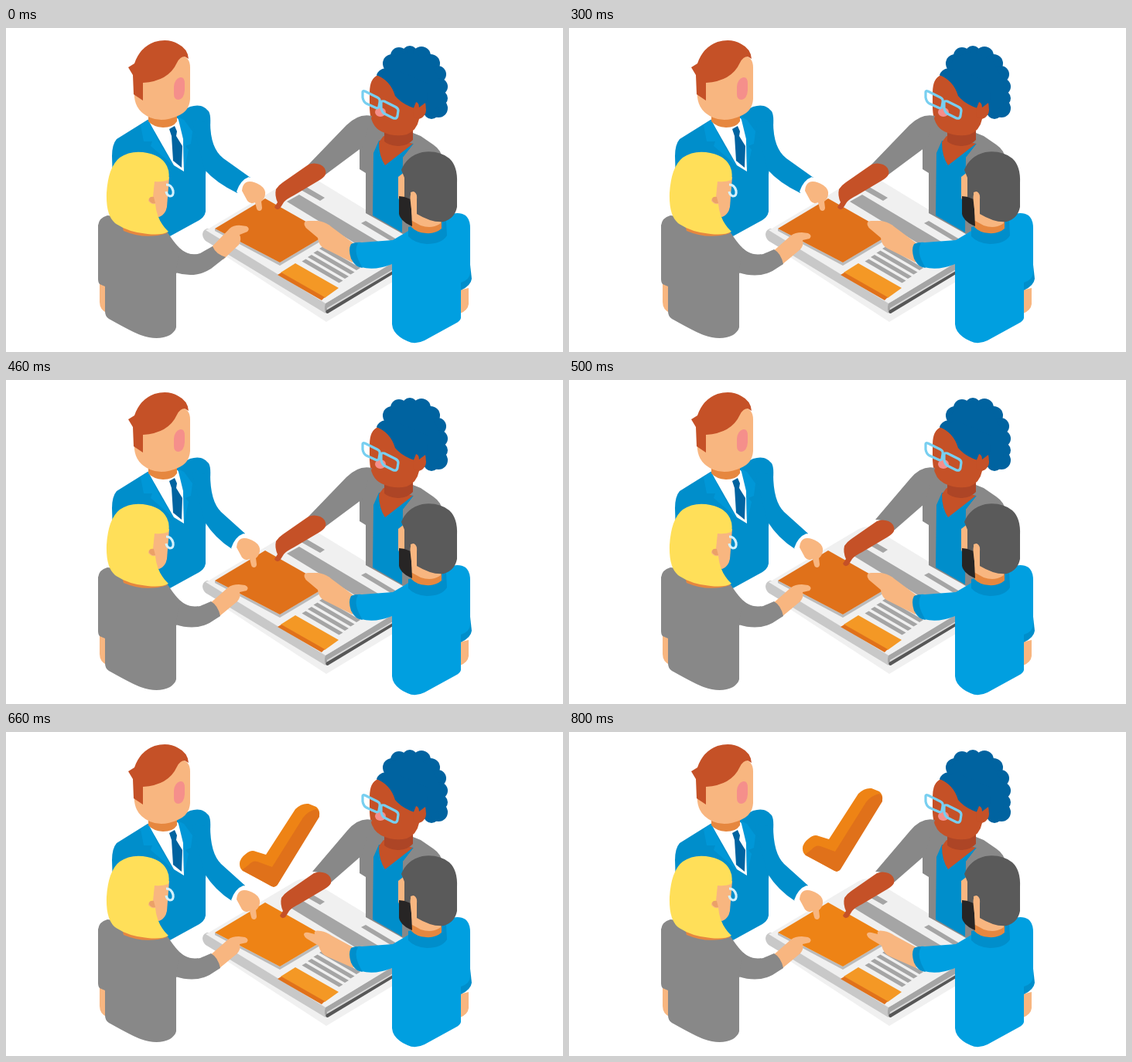
An HTML page for the animation above (0.9 s loop, 720 by 420 pixels).

```html
<!DOCTYPE html>
<html lang="en">
<head>
<meta charset="utf-8">
<title>Team agreement</title>
<style>
  html, body { margin: 0; width: 100%; height: 100%; overflow: hidden; background: #fff; }
  svg { display: block; width: 100vw; height: 100vh; }
  .navy { fill: #0063a0; }
  .blue { fill: #008ecb; }
  .lapel { fill: #0097d7; }
  .sky { fill: #009fe0; }
  .grey { fill: #888; }
  .bar { fill: #a5a5a5; }
  .paper { fill: #f0f0f0; }
  .skin { fill: #f8b680; }
  .neck { fill: #e6873f; }
  .brown { fill: #c55127; }
  .pink { fill: #f58f8b; }
  .light { fill: #ee8315; }
  .dark { fill: #e0711a; }
  .white { fill: #fff; }
  .specs { fill: none; stroke: #78cff0; stroke-width: 3.2; stroke-linejoin: round; }
  .specs.pale { stroke: #d4f1fc; }
</style>
</head>
<body>
<svg viewBox="0 0 720 420">
  <g id="newspaper">
    <path class="paper" d="M272 288L414 381L500 329V300Z"/>
    <path fill="#c8c8c8" d="M260 260C253 262 252 270 258 276L413 370L418 352L280 262Z"/>
    <path class="bar" d="M413 357L500 304V319L415 370Q410 366 413 357Z"/>
    <path fill="#d8d8d8" d="M415 363L500 313V315L415 366Z"/>
    <path fill="#575757" d="M414 366L500 315V319L416 370Q412 370 414 366Z"/>
    <path class="paper" d="M258 262Q263 260 267 257L375 193Q386 187 397 194L515 266L500 304L413 357Z"/>
    <path class="bar" d="M376 207L383 203L412 220L406 224Z"/>
    <path class="bar" d="M363 225L379 216L483 278L466 288Z"/>
    <path class="bar" d="M459 253L465 250L505 274L499 277Z"/>
    <g id="lines"></g>
    <path fill="#bbb" d="M270 260L354 304L416 267V271L354 308L270 263Z"/>
    <path id="sheet" d="M270 260L335 221L416 267L354 304Z"/>
    <path fill="#f49825" d="M374 305L430 337L412 350L355 317Z"/>
    <path class="dark" d="M356 317L412 349L408 353L351 320Z"/>
  </g>

  <g id="mark">
    <path class="light" d="M302 151Q302 144 310 138Q317 132 323 135L336 139L374 80Q382 72 391 73L401 77Q406 81 405 88L350 179L346 181L306 160Q302 157 302 151Z"/>
    <path class="dark" d="M305 159L314 152Q319 146 325 148L344 155L384 91Q391 82 401 80Q406 82 405 90L351 178Q348 182 343 180Z"/>
  </g>

  <g id="suited-man">
    <path class="blue" d="M137 166Q137 151 143 144L183 119L222 110L238 102Q254 97 262 108Q265 113 264 126L262 155L258 190V238Q257 245 250 249L210 271L138 200Z"/>
    <path id="sleeve" class="blue"/>
    <g id="suited-hand">
      <path class="white" d="M298 212Q303 197 314 193L320 198L306 217Q301 217 298 212Z"/>
      <path class="skin" d="M305 211Q306 199 315 199Q321 199 329 204Q336 209 335 216Q334 222 330 225L331 233C331 238 325 238 324 234L322 226Q316 229 312 224Z"/>
    </g>
    <path class="white" d="M184 120L222 117L229 128L230 186L217 178Z"/>
    <path class="lapel" d="M184 119L174 126L178 147L189 147L187 153L216 178L197 147ZM222 115L230 119L241 134L239 150L232 153L236 158L230 185L229 144Z"/>
    <path class="navy" d="M211 131L218 127L221 134L220 140L228 153L227 181L216 172L214 140Z"/>
    <path class="neck" d="M184 108H221V121Q216 129 203 129Q190 128 184 121Z"/>
    <path class="skin" d="M165 58L226 35Q238 38 238 51V92Q237 108 222 114Q202 123 186 116Q168 108 166 90Z"/>
    <path class="brown" d="M158 51L166 46Q173 25 192 18Q210 13 223 21Q235 27 236 40L231 37Q225 37 221 45Q210 69 177 71V94L165 86L164 61Z"/>
    <path class="pink" d="M217 76Q218 66 225 64Q231 63 231 72V81Q230 92 223 93Q217 93 217 86Z"/>
  </g>

  <g id="curly-woman">
    <path class="grey" d="M457 123Q462 112 475 115L486 120L536 140L552 151Q564 159 564 171L540 262L513 267L465 240V188L457 183Z"/>
    <path class="blue" d="M482 146L475 162L474 243L512 265L513 168L527 150Z"/>
    <path class="brown" d="M482 148L488 140L526 150L490 178Q482 166 482 148Z"/>
    <path class="grey" d="M527 150L513 168V266L520 262L560 165L536 144Z"/>
    <path fill="#ad4526" d="M489 132L526 128V145Q519 153 506 153Q494 152 489 147Z"/>
    <g id="curls" class="navy"></g>
    <path class="navy" d="M479 61Q481 54 490 52L498 38L522 30L548 42L562 70L561 100L548 112L524 110Z"/>
    <path class="brown" d="M470 84Q470 65 481 61Q491 62 496 67Q502 91 527 99L543 103Q544 115 534 118Q531 133 518 138Q501 142 485 134Q471 127 470 104Z"/>
    <path class="navy" d="M479 61L500 52L546 72L543 105L536 104L528 104Q511 98 503 88Q497 68 479 61Z"/>
    <path class="brown" d="M526 106L530 96Q534 97 534 103L542 97Q545 111 536 117L527 116Z"/>
    <ellipse class="pink" cx="484" cy="109" rx="7" ry="6"/>
    <path class="specs" d="M461 83Q461 81 464 82L480 90Q484 92 483 96L482 102Q481 105 477 103L466 98Q462 96 461 90ZM485 97Q485 94 489 95L503 102Q507 104 507 107L506 114Q505 118 501 117L489 111Q486 109 485 104Z"/>
    <path id="cardigan-sleeve" class="grey"/>
    <g id="curly-hand">
      <path class="brown" d="M391 177Q398 174 406 177Q415 181 413 190Q411 194 404 198L372 217Q362 222 359 226L354 234Q349 237 347 232L351 226Q347 217 349 209Q352 204 358 200Z"/>
    </g>
  </g>

  <g id="blonde-woman">
    <path class="skin" d="M121 330L130 335V369Q121 365 121 355Z"/>
    <path class="grey" d="M119 256Q120 246 131 243L150 245L207 262Q220 283 229 289Q239 295 249 293L220 318V388Q219 393 212 398Q196 406 174 398Q165 395 133 377Q128 374 128 367V335L121 332Q119 330 119 325Z"/>
    <path id="blonde-hand" class="skin"/>
    <path id="knit-sleeve" class="grey"/>
    <path class="neck" d="M150 255L197 253L208 266Q180 275 152 263Z"/>
    <path class="skin" d="M180 192L211 193L208 232Q206 242 198 245L180 240Z"/>
    <path fill="#ffdf59" d="M130 214Q132 180 147 168Q160 159 177 161Q201 164 208 179Q212 187 210 197Q202 200 192 199L190 219Q184 219 184 224Q187 229 193 228Q195 250 210 264Q201 269 183 267Q158 265 141 253Q129 243 130 214Z"/>
    <path fill="#eba168" d="M191 219Q185 218 185 223Q187 228 193 227Z"/>
    <path class="specs pale" d="M207 203Q214 203 216 211Q217 218 212 218Q208 217 207 212"/>
  </g>

  <g id="bearded-man">
    <path class="skin" d="M586 340L598 337V358Q597 366 587 370Z"/>
    <path id="bearded-hand" class="skin"/>
    <path class="blue" d="M600 307L602 325Q601 334 588 340V318Z"/>
    <path class="sky" d="M446 283Q449 277 460 278L500 275L525 260L570 243Q585 237 594 243Q600 248 600 259V317Q600 326 588 330V376Q587 380 581 383L541 405Q529 411 519 406Q500 398 499 384V306Q477 315 459 310Q447 304 446 283Z"/>
    <path class="blue" d="M446 280Q452 277 455 279Q448 290 461 311Q452 311 446 299Q442 287 446 280Z"/>
    <path class="blue" d="M520 258L569 249L570 269Q563 280 544 280Q528 279 520 270Z"/>
    <path class="neck" d="M524 245L563 243V260Q555 267 543 266Q530 265 524 258Z"/>
    <path class="skin" d="M507 193L516 186L562 240V253Q551 261 536 256L516 245L507 220Z"/>
    <path fill="#272525" d="M508 218L516 219L523 214L525 257Q510 251 508 241Z"/>
    <path fill="#5a5a5a" d="M511 184Q518 166 538 161Q559 158 573 169Q584 179 583 201V232Q580 247 566 251Q551 253 531 241V219Q529 210 523 213V222L515 219V194Z"/>
    <path class="skin" d="M523 226Q521 213 527 212Q532 214 531 223V244L525 243Z"/>
  </g>
</svg>
<script>
const LOOP = 900;
const el = id => document.getElementById(id);

// Curls: [x, y, radius]
el('curls').innerHTML = [
  [499, 46, 12], [508, 36, 11], [522, 33, 10], [537, 36, 12],
  [549, 46, 12], [558, 60, 11], [560, 76, 11], [561, 91, 10], [559, 104, 12], [550, 108, 10]
].map(([x, y, r]) => `<circle cx="${x}" cy="${y}" r="${r}"/>`).join('');

el('lines').innerHTML = [0, 1, 2, 3].map(i =>
  `<path class="bar" d="M${405 - 7.5 * i} ${286 + 5.5 * i}l5 -3l48 28l-5 3Z"/>`).join('');

// Each limb has a resting shape and a shape after it has moved.
const limbs = [
  { id: 'blonde-hand', at: 300, shapes: [
    'M262 288L289 260Q295 255 304 256L311 257Q316 260 312 264L302 268Q305 274 301 281L281 300Z',
    'M262 291L287 269Q292 265 301 265L309 266Q315 269 311 273L302 275Q304 281 299 287L275 307Z'] },
  { id: 'knit-sleeve', at: 300, shapes: [
    'M225 286Q237 297 251 292L267 283Q271 293 284 297L265 312Q245 325 219 317Z',
    'M225 286Q237 297 251 293L265 287Q274 292 277 306L263 315Q244 325 219 317Z'] },
  { id: 'sleeve', at: 400, shapes: [
    'M240 120L264 122Q264 156 281 169L316 194Q305 197 299 214Q272 201 257 184Z',
    'M240 120L264 122Q264 157 278 171L309 199Q297 203 292 219Q270 205 257 184Z'] },
  { id: 'cardigan-sleeve', at: 500, shapes: [
    'M473 114Q456 110 440 126L391 177Q406 178 413 190L460 155Z',
    'M473 114Q456 110 441 128L396 181Q411 181 420 195L460 160Z'] },
  { id: 'bearded-hand', at: 600, shapes: [
    'M386 256Q384 250 391 250L403 250Q413 251 421 258L453 282L448 304L412 286Q404 282 403 272L390 261Q387 259 386 256Z',
    'M385 263Q385 259 391 260L399 262Q397 256 407 258Q414 259 421 264L454 282L449 306L415 291Q407 288 404 277L389 268Q386 266 385 263Z'] }
];

const shift = (id, x, y) => el(id).setAttribute('transform', `translate(${x} ${y})`);

function draw(t) {
  for (const { id, at, shapes } of limbs) el(id).setAttribute('d', shapes[+(t >= at)]);
  shift('suited-hand', ...(t >= 400 ? [-7, 6] : [0, 0]));
  shift('curly-hand', ...(t >= 500 ? [7, 6] : [0, 0]));

  const agreed = t >= 600;
  el('sheet').setAttribute('class', agreed ? 'light' : 'dark');
  el('mark').style.display = agreed ? '' : 'none';
  shift('mark', 0, t < 700 ? 20 : t < 800 ? 6 : 0);
}

const start = performance.now();
function tick() {
  draw((performance.now() - start) % LOOP);
  requestAnimationFrame(tick);
}
tick();
</script>
</body>
</html>
```
